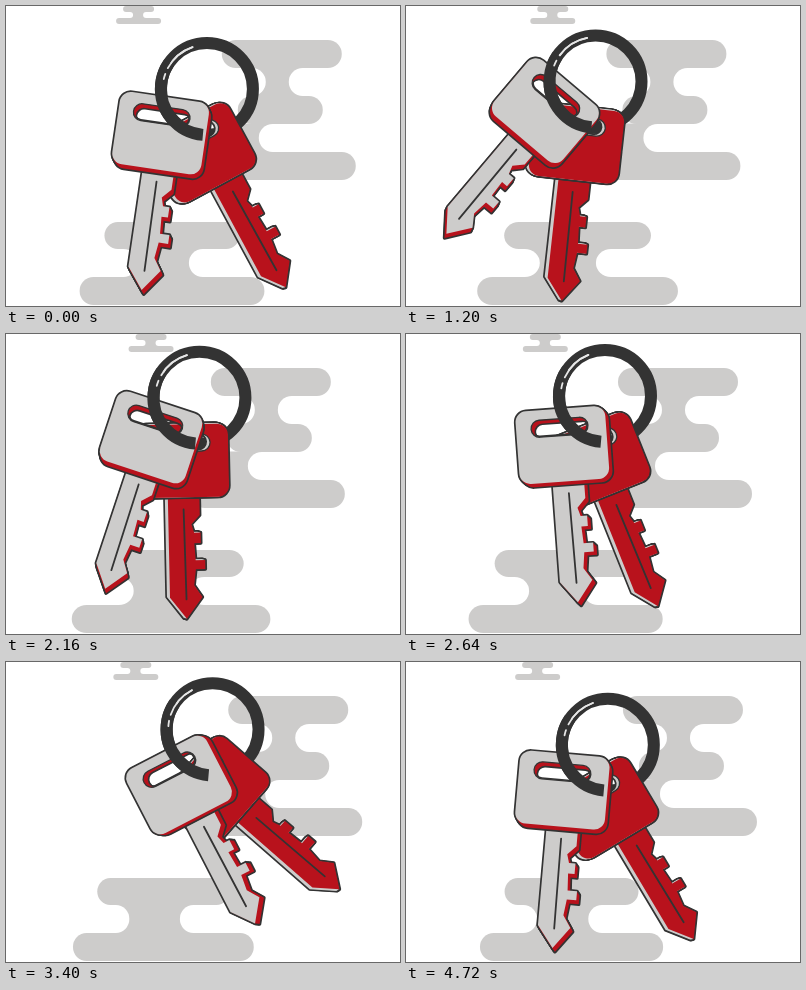
These frames come from a looping animation (394 by 300 pixels, 4.76 s). An HTML page with a canvas:

```html
<!DOCTYPE html>
<html lang="en">
<head>
<meta charset="utf-8">
<title>Keys on a ring</title>
<style>
html, body { margin: 0; width: 100%; height: 100%; overflow: hidden; background: #fff; }
canvas { display: block; width: 394px; height: 300px; }
</style>
</head>
<body>
<canvas id="stage"></canvas>
<script>
const W = 394, H = 300, LOOP = 4760, STEP = 40, CYCLE = 4800;
const GRAY = '#cdcccb', RED = '#b8121c', DARK = '#333', SHINE = '#e6e6e6';
const rad = d => d * Math.PI / 180;

const canvas = document.getElementById('stage');
const ctx = canvas.getContext('2d');
const dpr = window.devicePixelRatio || 1;
canvas.width = W * dpr;
canvas.height = H * dpr;

// Everything sways: one slow wave, at times with a faint overtone. Peaks in degrees.
let phase = 0;
const wave = (mean, amp, peak, amp2 = 0, peak2 = 0) =>
  mean + amp * Math.cos(rad(phase - peak)) + amp2 * Math.cos(rad(2 * (phase - peak2)));

function at(x, y, paint) {
  ctx.save();
  ctx.translate(x, y);
  paint();
  ctx.restore();
}

// Clouds: pills joined by webs with round notches
function pill(x1, x2, y, h) {
  ctx.fillStyle = GRAY;
  ctx.beginPath();
  ctx.roundRect(x1, y, x2 - x1, h, h / 2);
  ctx.fill();
}

function notch(x, y, h) {
  ctx.fillStyle = '#fff';
  ctx.beginPath();
  ctx.arc(x, y + h / 2, h / 2, 0, 2 * Math.PI);
  ctx.fill();
}

function web(x1, x2, y, h, openLeft = true) {
  ctx.fillStyle = GRAY;
  ctx.fillRect(x1, y - 0.5, x2 - x1, h + 1);
  if (openLeft) notch(x1, y, h);
  notch(x2, y, h);
}

function drawClouds() {
  at(wave(332, 12.2, 288), 0, () => {
    web(-90, -39, 62, 28);
    web(-104, -69, 118, 28, false);
    pill(-120, 0, 34, 28);
    pill(-104, -19, 90, 28);
    pill(-140, 14, 146, 28);
  });

  const left = wave(69.5, 5, 10, 2.4, 125), right = wave(259.5, 12.5, 95);
  at(left, 0, () => {
    ctx.scale((right - left) / 186, 1);
    web(44, 124, 243, 28);
    pill(25, 161, 216, 27);
    pill(0, 186, 271, 28);
  });

  at(wave(115, 10.5, 118), 0, () => {
    web(14, 30, 6, 6);
    pill(7, 38, 0, 6);
    pill(0, 45, 12, 6);
  });
}

// Key parts, centred on the head
const slot = new Path2D();
slot.roundRect(-30, -27, 57, 17, 8.5);

const head = new Path2D();
head.roundRect(-45, -37, 90, 73, 11);
head.addPath(slot);

const blade = new Path2D('M-12.5 30V136L4 157.5L20 136L12 124L14 108H23.5V99' +
  'H14L13 82H19.5V71.5H13L10.5 63L19 54V30Z');
const groove = new Path2D('M3 48L4 138');

// A flat shape with a coloured edge pulled out by dx, dy
function slab(shape, key) {
  const copies = [1, 0.75, 0.5, 0.25, 0];
  const each = paint => copies.forEach(k => at(key.dx * k, key.dy * k, () => paint(k)));
  ctx.strokeStyle = DARK;
  ctx.lineWidth = 3.4;
  ctx.lineJoin = 'round';
  each(() => ctx.stroke(shape));
  each(k => {
    ctx.fillStyle = k ? key.side : key.face;
    ctx.fill(shape, 'evenodd');
  });
}

// The key turns about the point where it hangs on the ring
function inKey(key, ring, paint) {
  at(ring.x + key.hookX, ring.y + key.hookY, () => {
    ctx.rotate(rad(key.rot));
    ctx.translate(-key.holeX, -key.holeY);
    paint();
  });
}

function drawKey(key, ring) {
  inKey(key, ring, () => {
    at(key.shift, 0, () => {
      slab(blade, key);
      ctx.lineWidth = 1.8;
      ctx.lineCap = 'round';
      ctx.stroke(groove);
    });
    slab(head, key);
    ctx.lineWidth = 1.3;
    ctx.stroke(slot);
  });
}

function arc(r, from, to, width, color, cap = 'butt') {
  ctx.beginPath();
  ctx.arc(0, 0, r, rad(from), rad(to));
  ctx.lineWidth = width;
  ctx.lineCap = cap;
  ctx.strokeStyle = color;
  ctx.stroke();
}

function drawRing(ring, from, to) {
  at(ring.x, ring.y, () => {
    arc(46, from, to, 12, DARK);
    ctx.rotate(rad(ring.rot));
    arc(44.3, 207, 250, 1.8, SHINE, 'round');
    arc(44.3, 192, 199, 1.8, SHINE, 'round');
  });
}

// The ring passes over the head's top edge and dives into the slot
function drawRingFront(ring, key) {
  ctx.save();
  const mouth = new Path2D();
  mouth.roundRect(-150, -160, 177, 150, [0, 0, 8.5, 0]);
  inKey(key, ring, () => ctx.clip(mouth));
  drawRing(ring, 95, 215);
  ctx.restore();
}

function draw(now) {
  const t = Math.floor(now % LOOP / STEP) * STEP;
  phase = 360 * t / CYCLE;

  ctx.setTransform(dpr, 0, 0, dpr, 0, 0);
  ctx.fillStyle = '#fff';
  ctx.fillRect(0, 0, W, H);
  drawClouds();

  const swing = wave(7, 34, 89, 1.5, 150);
  const tilt = rad(50 + 0.6 * swing);
  const ring = {
    x: wave(198.5, 9.3, 285),
    y: wave(72.7, 10.7, 15),
    rot: 0.25 * swing - 1
  };
  const silver = {
    rot: swing, shift: 0, face: GRAY, side: RED,
    hookX: -22, hookY: 30, holeX: 22, holeY: -18,
    dx: 4.6 * Math.cos(tilt), dy: 4.6 * Math.sin(tilt)
  };
  const red = {
    rot: wave(-21, 30, 107, 2.8, 150), shift: wave(1, 5, 330), face: RED, side: GRAY,
    hookX: -9, hookY: 39.5, holeX: 7.5, holeY: -24,
    dx: -3, dy: -0.8
  };

  drawRing(ring, 0, 360);
  drawKey(red, ring);
  drawKey(silver, ring);
  drawRingFront(ring, silver);
}

function tick() {
  draw(performance.now());
  requestAnimationFrame(tick);
}
tick();
</script>
</body>
</html>
```
